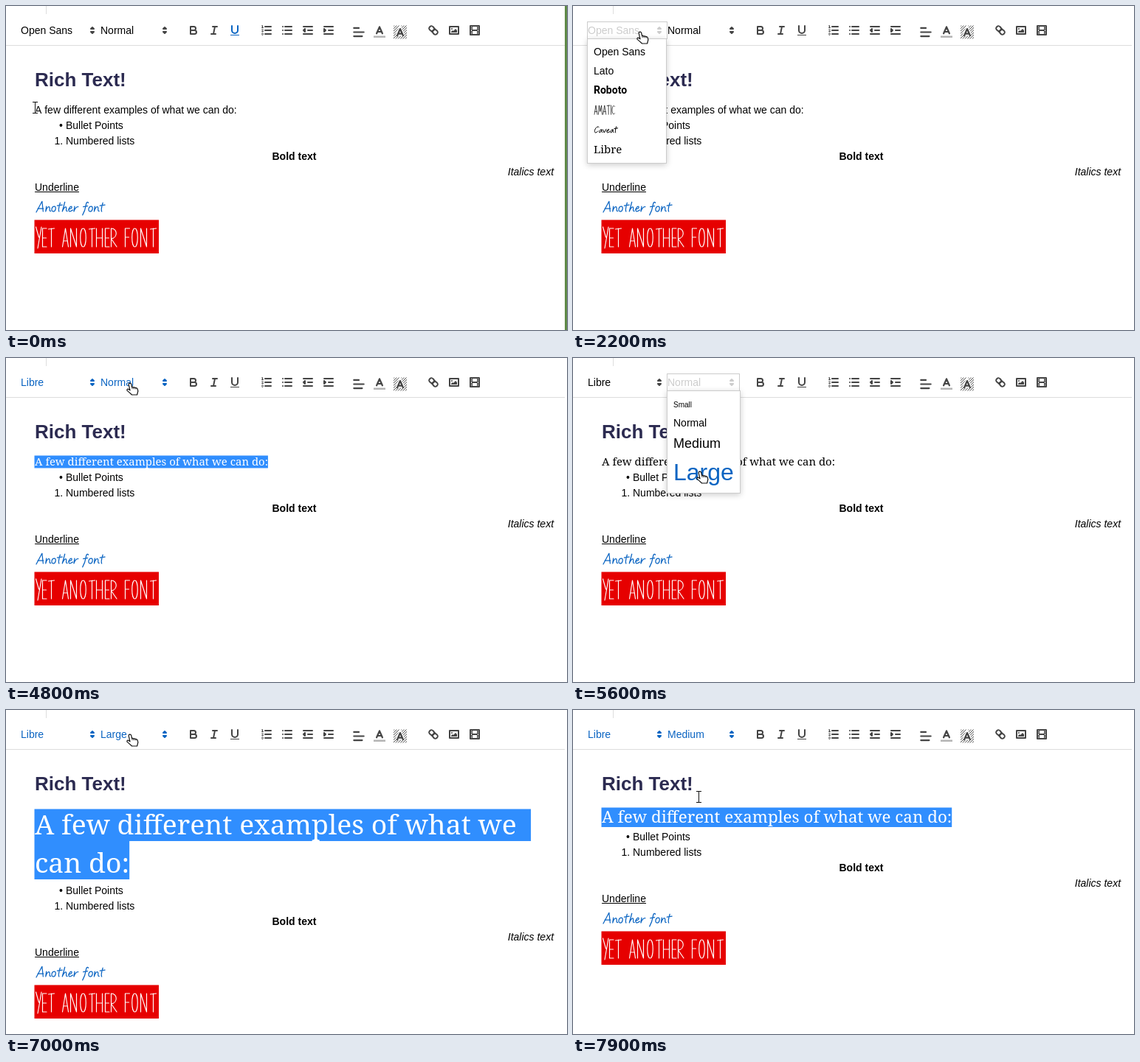
Animation, 760 px wide and 440 px high, one loop 8000 ms. Source, as an HTML page with a canvas:

```html
<!DOCTYPE html>
<html lang="en">
<head>
<meta charset="utf-8">
<title>Rich text editor</title>
<style>
  html, body { margin: 0; width: 100%; height: 100%; overflow: hidden; background: #fff; }
  canvas { display: block; }
</style>
</head>
<body>
<canvas id="stage" width="760" height="440"></canvas>
<script>
const ctx = document.getElementById('stage').getContext('2d');
const LOOP = 8000;
const SANS = '"Liberation Sans", Arial, sans-serif';
const SERIF = '"Noto Serif", "Liberation Serif", serif';
const BLUE = '#0a64c2', DARK = '#444', PALE = '#ccc', MARK = '#308efe';
const LEFT = 38.5;
const SENTENCE = 'A few different examples of what we can do:';

// Cursor hotspot: time, x, y
const PATH = [
  [0, 39, 138], [300, 39, 138], [1200, 351, 131], [1300, 344, 131], [1500, 344, 131],
  [2100, 93, 35], [2300, 93, 35], [3200, 62, 145], [3400, 60, 164], [3500, 60, 164],
  [3800, 59, 190], [4200, 59, 190], [4800, 170, 34], [5000, 170, 34], [5600, 174, 154],
  [5900, 174, 154], [6000, 174, 160], [6200, 174, 160], [6600, 237, 106], [6700, 237, 106],
  [7000, 170, 33], [7100, 170, 33], [7500, 164, 81], [7600, 164, 81], [7700, 170, 118],
  [8000, 170, 118]
];

// Hand-lettered alphabets: advance width and pen path
const NARROW = {
  ' ': [9, ''],
  Y: [9, 'M0-2L4 12M7.5-2L2.5 27'],
  A: [11, 'M0 25L4 0L8 25M1.4 17H7'],
  N: [13, 'M0 25V0L8 25V0'],
  O: [12, 'M4 0C-1 0-1 25 4 25C9 25 9 0 4 0'],
  T: [10, 'M0 1L8 0M4 0V25'],
  H: [12, 'M0 0V25M8 0V25M0 13H8'],
  E: [8, 'M5.5 0H0V25H5.5M0 13H5'],
  R: [10, 'M0 25V0C9 0 9 13 0 14L7.5 25'],
  F: [9, 'M0 25V0H6M0 12H5'],
  M: [13, 'M0 25L2 0L5 17L8.5 0L10.5 25'],
  I: [4, 'M1 0V25'],
  C: [8, 'M7 3C4-3 0 4 0 13S4 28 7 22']
};
const SCRIPT = {
  ' ': [5.5, ''],
  A: [13, 'M0 1L8-14L9.5 0M2-4H10'],
  C: [9, 'M9-11C5-16-3-2 2 0Q5 0 7-3'],
  a: [8, 'M5.5-6C2-8-1 0 1.5 0Q4 0 5.5-6Q5 0 7-.5'],
  e: [7.5, 'M.5-3Q6-4 5-6.5C3-9-1-1 2 0Q4 0 6.5-2'],
  f: [8, 'M8-12Q5.5-15 4.5-8T0 5M1-6.5L7-7.5'],
  h: [8, 'M3.5-13L0 0C3-7 6-8 5.5-4Q5 0 7-.5'],
  n: [8, 'M1-7L0 0C2-7 6-9 5.5-3Q5.3 0 7-.5'],
  o: [8, 'M4-7C0-7-1 0 2.5 0S7-7 4-7'],
  r: [7, 'M1.5-7L.5 0Q3-7 6.5-6.5'],
  t: [7, 'M4-12Q1-2 2.5 0M0-8L7-9'],
  v: [7, 'M0-6L2.5 0L6.5-7']
};

// Toolbar icons on an 18-unit grid: s = 2px stroke, t = 1px stroke, f = fill
const ICONS = {
  bold: { s: 'M5 4H9.5A2.5 2.5 0 0 1 9.5 9H5ZM5 9H10.5A2.5 2.5 0 0 1 10.5 14H5Z' },
  italic: { s: 'M7 4H13M5 14H11M8 14L10 4' },
  underline: { s: 'M5 3V9A4 4 0 0 0 13 9V3', f: 'M3 15H15V16H3Z' },
  ordered: {
    s: 'M7 4H15M7 9H15M7 14H15',
    t: 'M2.5 5.5H4.5M2.5 3L3.5 2.5V5.5M4.5 10.5H2.5C2.5 10.3 4.35 9.4 4.35 8.3A.96 .96 0 0 0 2.5 8.15' +
       'M2.5 14.85A.96 .96 0 0 0 4.35 14.74A.7 .7 0 0 0 3.75 14A.7 .7 0 0 0 4.35 13.26A.96 .96 0 0 0 2.5 13.15'
  },
  bullet: { s: 'M6 4H15M6 9H15M6 14H15M3 4H3.01M3 9H3.01M3 14H3.01' },
  outdent: { s: 'M3 14H15M3 4H15M9 9H15M5 7V11L3 9Z' },
  indent: { s: 'M3 14H15M3 4H15M9 9H15M3 7V11L5 9Z' },
  align: { s: 'M3 9H15M3 14H13M3 4H9' },
  color: { s: 'M5.5 11L9 3L12.5 11M11.6 9H6.4' },
  letter: { s: 'M5.5 13L9 5L12.5 13M11.6 11H6.4' },
  link: {
    s: 'M7 11L11 7M8.9 4.58A3.48 3.48 0 0 1 9.26 9.26A3.48 3.48 0 0 1 4.58 8.9C3.19 7.5 2.04 6.4 4.22 4.22S7.5 3.19 8.9 4.58Z' +
       'M13.42 9.1A3.48 3.48 0 0 0 8.74 8.74A3.48 3.48 0 0 0 9.1 13.42C10.5 14.81 11.6 15.96 13.78 13.78S14.8 10.5 13.42 9.1Z'
  },
  image: { s: 'M3 4H15V14H3Z', f: 'M5 12V11L7 9L8 10L11 7L13 9V12ZM5 7A1 1 0 0 1 7 7A1 1 0 0 1 5 7Z' },
  video: { s: 'M3 3H15V15H3Z', f: 'M5 3H6V15H5ZM12 3H13V15H12ZM5 8H13V10H5ZM3 5H6V6H3ZM3 7H6V8H3ZM3 10H6V11H3ZM3 12H6V13H3ZM12 5H15V6H12ZM12 7H15V8H12ZM12 10H15V11H12ZM12 12H15V13H12Z' },
  arrows: { s: 'M7 11L9 13L11 11ZM7 7L9 5L11 7Z' }
};
const BUTTONS = [
  ['bold', 245], ['italic', 273], ['underline', 301],
  ['ordered', 344], ['bullet', 372], ['outdent', 400], ['indent', 428],
  ['link', 570], ['image', 598], ['video', 626]
];

const FONT_MENU = {
  x: 19, w: 108, h: 170,
  items: [
    { top: 49, draw: c => text('Open Sans', 28, 67, c) },
    { top: 75, draw: c => text('Lato', 28, 93, c) },
    { top: 101, draw: c => text('Roboto', 28, 119, c, 'bold 14px Roboto, sans-serif') },
    { top: 127, draw: c => lettering('AMATIC', NARROW, 29, 135, 0.49, c, 0.7) },
    { top: 154, draw: c => lettering('Caveat', SCRIPT, 29, 172, 0.68, c, 1) },
    { top: 181, draw: c => serif('Libre', 28, 200, 14, c) }
  ]
};
const sizeItem = (label, size, top, y) => (
  { top, draw: c => text(label, 136, y, c, `${size}px ${SANS}`) });
const SIZE_MENU = {
  x: 127, w: 100, h: 140,
  items: [
    sizeItem('Small', 10, 53, 67), sizeItem('Normal', 14, 77, 93),
    sizeItem('Medium', 18, 101, 122), sizeItem('Large', 32, 133, 166)
  ]
};

const within = (t, a, b) => t >= a && t < b;

function rect(x, y, w, h, color) {
  ctx.fillStyle = color;
  ctx.fillRect(x, y, w, h);
}

function text(str, x, y, color = '#000', font = `14px ${SANS}`) {
  ctx.font = font;
  ctx.fillStyle = color;
  ctx.fillText(str, x, y);
}

function serif(str, x, y, size, color, mark) {
  ctx.font = `${size * 1.066}px ${SERIF}`;
  if (mark) {
    const w = ctx.measureText(str).width + (mark.extra || 0);
    rect(LEFT, mark.y, x - LEFT + w, mark.h, MARK);
  }
  ctx.fillStyle = color;
  ctx.fillText(str, x, y);
}

function lettering(str, glyphs, x, y, scale, color, weight) {
  ctx.save();
  ctx.translate(x, y);
  ctx.scale(scale, scale);
  ctx.strokeStyle = color;
  ctx.lineWidth = weight / scale;
  ctx.lineCap = ctx.lineJoin = 'round';
  for (const ch of str) {
    const [advance, d] = glyphs[ch];
    ctx.stroke(new Path2D(d));
    ctx.translate(advance, 0);
  }
  ctx.restore();
}

function icon(name, x, y, color = DARK, scale = 1) {
  const { s, t, f } = ICONS[name];
  ctx.save();
  ctx.translate(x, y);
  ctx.scale(scale, scale);
  ctx.strokeStyle = ctx.fillStyle = color;
  ctx.lineCap = ctx.lineJoin = 'round';
  ctx.lineWidth = 2;
  if (s) ctx.stroke(new Path2D(s));
  ctx.lineWidth = 1;
  if (t) ctx.stroke(new Path2D(t));
  if (f) ctx.fill(new Path2D(f));
  ctx.restore();
}

function hatchIcon(x, y) {
  ctx.save();
  ctx.beginPath();
  ctx.rect(x + 1, y + 1, 18, 18);
  ctx.clip();
  ctx.strokeStyle = DARK;
  ctx.lineWidth = 1;
  ctx.beginPath();
  for (let k = 3; k < 40; k += 3.3) {
    ctx.moveTo(x + k, y);
    ctx.lineTo(x + k - 20, y + 20);
  }
  ctx.stroke();
  ctx.translate(x, y);
  ctx.scale(20 / 18, 20 / 18);
  ctx.strokeStyle = '#fff';
  ctx.lineWidth = 4.5;
  ctx.stroke(new Path2D(ICONS.letter.s));
  ctx.restore();
  icon('letter', x, y, DARK, 20 / 18);
}

function picker(label, x, w, open, active) {
  const color = open ? PALE : active ? BLUE : '#000';
  if (open) {
    ctx.strokeStyle = PALE;
    ctx.lineWidth = 1;
    ctx.strokeRect(x - 0.5, 21.5, w, 23);
  }
  text(label, x, 38, color);
  icon('arrows', x + w - 20, 24, open ? PALE : active ? BLUE : DARK);
}

function menu({ x, w, h, items }, hover, selected) {
  ctx.save();
  ctx.shadowColor = 'rgba(0,0,0,.2)';
  ctx.shadowBlur = 8;
  ctx.shadowOffsetY = 2;
  rect(x, 44, w, h, PALE);
  ctx.restore();
  rect(x + 1, 45, w - 2, h - 2, '#fff');
  items.forEach((item, i) => item.draw(i === hover || i === selected ? BLUE : '#000'));
}

function toolbar(s) {
  rect(54, 0, 1, 11, '#ddd');
  rect(0, 53, 757, 1, '#ddd');
  picker(s.font, 20, 108, s.fontOpen, s.fontActive);
  picker(s.size, 128, 98, s.sizeOpen, s.sizeActive);
  for (const [name, x] of BUTTONS) {
    icon(name, x, 24, name === 'underline' && s.underline ? BLUE : DARK);
  }
  icon('align', 468, 25.5, DARK, 20 / 18);
  icon('color', 496, 25, DARK, 20 / 18);
  rect(498, 40.5, 16, 2.5, '#b4b4b4');
  hatchIcon(524, 25.5);
}

function sentence(s) {
  const ink = s.marked ? '#fff' : '#000';
  const mark = (y, h, extra) => s.marked && { y, h, extra };
  if (s.font === 'Open Sans') {
    if (s.marked) rect(LEFT, 132.5, 274.5, 17, MARK);
    text(SENTENCE, 39, 146, ink);
  } else if (s.size === 'Large') {
    serif(SENTENCE.slice(0, 35), 39, 168.5, 35, ink, mark(134.5, 43.5, 19.5));
    serif(SENTENCE.slice(36), 39, 221, 35, ink, mark(178, 52));
  } else if (s.size === 'Medium') {
    serif(SENTENCE, 39, 153, 21, ink, mark(132.5, 26.5));
  } else {
    serif(SENTENCE, 39, 146, 14, ink, mark(132.5, 17));
  }
}

function page(s) {
  text('Rich Text!', 39, 109, '#2c2b51', `bold 26px ${SANS}`);
  sentence(s);
  ctx.save();
  ctx.translate(0, { Normal: 0, Large: 83, Medium: 10 }[s.size]);
  text('•', 72, 167);
  text('Bullet Points', 81, 167);
  text('1.', 65.4, 188);
  text('Numbered lists', 81, 188);
  text('Bold text', 360.5, 209, '#000', `bold 14px ${SANS}`);
  text('Italics text', 679.8, 230, '#000', `italic 14px ${SANS}`);
  text('Underline', 39, 251);
  rect(39, 252, 60, 1, '#000');
  lettering('Another font', SCRIPT, 41, 279, 0.98, BLUE, 1.25);
  rect(LEFT, 290.5, 168.5, 45.5, '#e60000');
  lettering('YET ANOTHER FONT', NARROW, 40.5, 302, 1, '#fff', 1.15);
  ctx.restore();
}

function hand(x, y) {
  ctx.save();
  ctx.translate(x - 7, y - 0.5);
  ctx.lineJoin = 'round';
  ctx.lineWidth = 1.2;
  ctx.fillStyle = '#fff';
  ctx.strokeStyle = '#111';
  const shape = new Path2D('M4.5 .7Q6.2 .4 6.7 2.2L7.6 6Q9 5.4 10 6.6Q11.6 6 12.6 7.2Q14.4 6.8 15.2 8.4Q16.4 11 15.2 14L14.6 16.5H7.5Q4.5 13.5 1 10.6Q.5 8.4 2.6 8.7L5 10.3L3.2 2.6Q3.1 1 4.5 .7Z');
  ctx.fill(shape);
  ctx.stroke(shape);
  ctx.lineWidth = 0.9;
  ctx.stroke(new Path2D('M7.6 6L8.2 8.6M10 6.6L10.5 8.8M12.6 7.2L13 9'));
  ctx.restore();
}

function beam(x, y) {
  x = Math.round(x);
  y = Math.round(y);
  const shape = new Path2D(`M${x - 3} ${y - 7.5}H${x + 4}M${x - 3} ${y + 7.5}H${x + 4}M${x + 0.5} ${y - 7}V${y + 7}`);
  ctx.lineCap = 'butt';
  ctx.strokeStyle = 'rgba(255,255,255,.8)';
  ctx.lineWidth = 3;
  ctx.stroke(shape);
  ctx.strokeStyle = '#111';
  ctx.lineWidth = 1;
  ctx.stroke(shape);
}

function cursorAt(t) {
  const i = Math.max(1, PATH.findIndex(p => p[0] > t));
  const [t0, x0, y0] = PATH[i - 1], [t1, x1, y1] = PATH[i];
  const p = (t - t0) / (t1 - t0);
  const e = p * p * (3 - 2 * p);
  return [x0 + (x1 - x0) * e, y0 + (y1 - y0) * e];
}

function draw(ms) {
  const t = Math.floor(ms / 100) * 100;
  const [x, y] = cursorAt(t);
  const fontOpen = within(t, 2200, 4300);
  const sizeOpen = within(t, 5000, 6000) || within(t, 7100, 7900);
  const marked = within(t, 1300, 2200) || within(t, 4300, 5000) || within(t, 6000, 7100) || t >= 7900;
  const font = t < 4300 ? 'Open Sans' : 'Libre';
  const size = t < 6000 ? 'Normal' : t < 7900 ? 'Large' : 'Medium';
  const overBar = y < 46;
  const state = {
    font, size, fontOpen, sizeOpen, marked,
    underline: t < 2200,
    fontActive: (marked && font === 'Libre') || (overBar && x < 127),
    sizeActive: (marked && size !== 'Normal') || (overBar && x >= 127 && x < 226)
  };

  rect(0, 0, 760, 440, '#fff');
  toolbar(state);
  page(state);
  if (within(t, 400, 1300)) rect(39, 133, 1, 16, '#000');
  if (t < 400) rect(757, 0, 3, 440, '#5f8a48');

  const hoverIn = items => items.filter(item => item.top <= y).length - 1;
  if (fontOpen) menu(FONT_MENU, hoverIn(FONT_MENU.items));
  if (sizeOpen) {
    const hover = t >= 7500 ? 2 : hoverIn(SIZE_MENU.items);
    menu(SIZE_MENU, hover, size === 'Large' ? 3 : -1);
  }
  (fontOpen || sizeOpen || y < 54 ? hand : beam)(x, y);
}

const start = performance.now();
function tick() {
  draw((performance.now() - start) % LOOP);
  requestAnimationFrame(tick);
}
tick();
</script>
</body>
</html>
```
